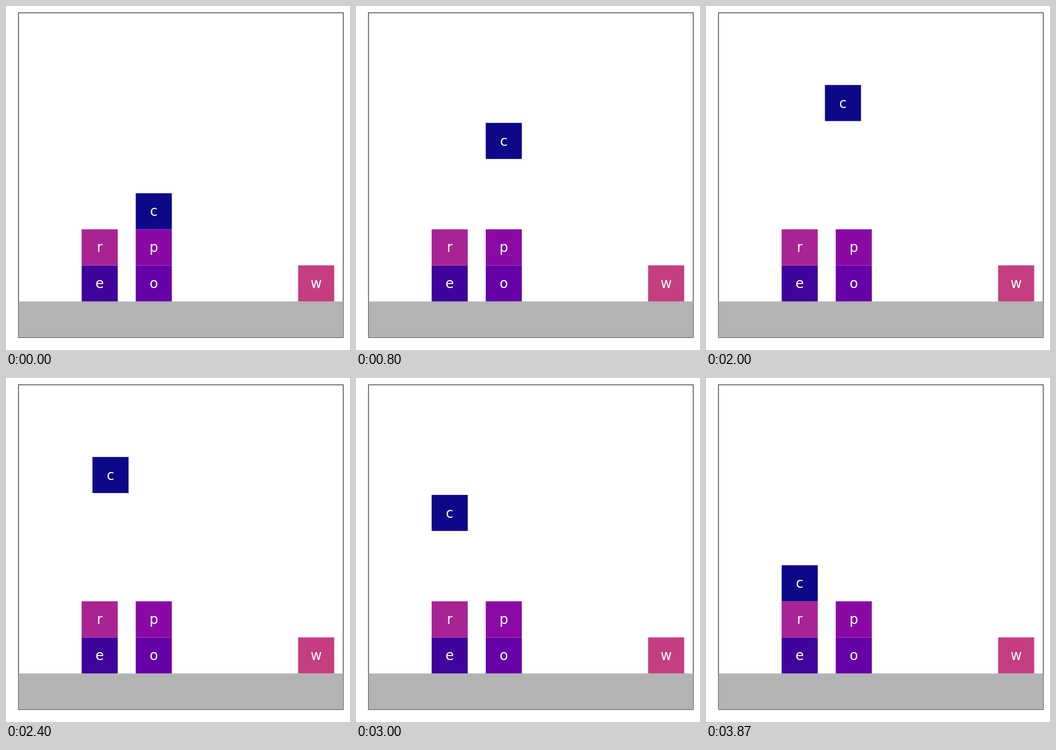
Recreate the animation shown at these times as an HTML page with a canvas. Size 600x600 px, loop 3940 ms.

```html
<!DOCTYPE html>
<html lang="en">
<head>
<meta charset="utf-8">
<title>Stacking blocks</title>
<style>
html, body { margin: 0; width: 100%; height: 100%; overflow: hidden; background: #fff; }
canvas { display: block; }
</style>
</head>
<body>
<canvas id="stage" width="600" height="600"></canvas>
<script>
const ctx = document.getElementById("stage").getContext("2d");
const LOOP = 3940, FPS = 15, LAST = 58;
const UNIT = 62.93, LEFT = 21.8, TOP = 11.9, FLOOR = TOP + 8 * UNIT;

// Letter, colour, column and row, in block units.
const blocks = [
  ["e", "#40039c", 1.75, 0],
  ["r", "#aa2395", 1.75, 1],
  ["o", "#6600a7", 3.25, 0],
  ["p", "#8a09a5", 3.25, 1],
  ["w", "#c43e7f", 7.75, 0],
];

const clamp = (v, max) => Math.max(0, Math.min(max, v));

function drawBlock(letter, color, col, row) {
  const x = LEFT + col * UNIT, y = FLOOR - (row + 1) * UNIT;
  ctx.fillStyle = color;
  ctx.fillRect(x, y, UNIT, UNIT);
  ctx.fillStyle = "#fff";
  ctx.fillText(letter, x + UNIT / 2, y + UNIT / 2 + 8.3);
}

// Lift for 20 steps, wait, shift for 10, lower for 20; the first two moves start with a double step.
function movingBlock(step) {
  const lift = step < 1 ? 0 : clamp(step + 1, 20);
  const shift = step < 30 ? 0 : clamp(step - 28, 10);
  const lower = clamp(step - 38, 20);
  return [3.25 - shift * 0.15, 2 + (lift - lower) * 0.15];
}

function draw(now) {
  const step = Math.min(LAST, Math.floor((now % LOOP + 4) * FPS / 1000));
  ctx.fillStyle = "#fff";
  ctx.fillRect(0, 0, 600, 600);
  ctx.strokeStyle = "#000";
  ctx.lineWidth = 1;
  ctx.strokeRect(LEFT, TOP, 9 * UNIT, 9 * UNIT);
  ctx.fillStyle = "#b3b3b3";
  ctx.fillRect(LEFT, FLOOR, 9 * UNIT, UNIT);

  ctx.font = '24px "DejaVu Sans", sans-serif';
  ctx.textAlign = "center";
  for (const block of blocks) drawBlock(...block);
  drawBlock("c", "#0d0887", ...movingBlock(step));
}

const start = performance.now();
function tick() {
  draw(performance.now() - start);
  requestAnimationFrame(tick);
}
tick();
</script>
</body>
</html>
```
